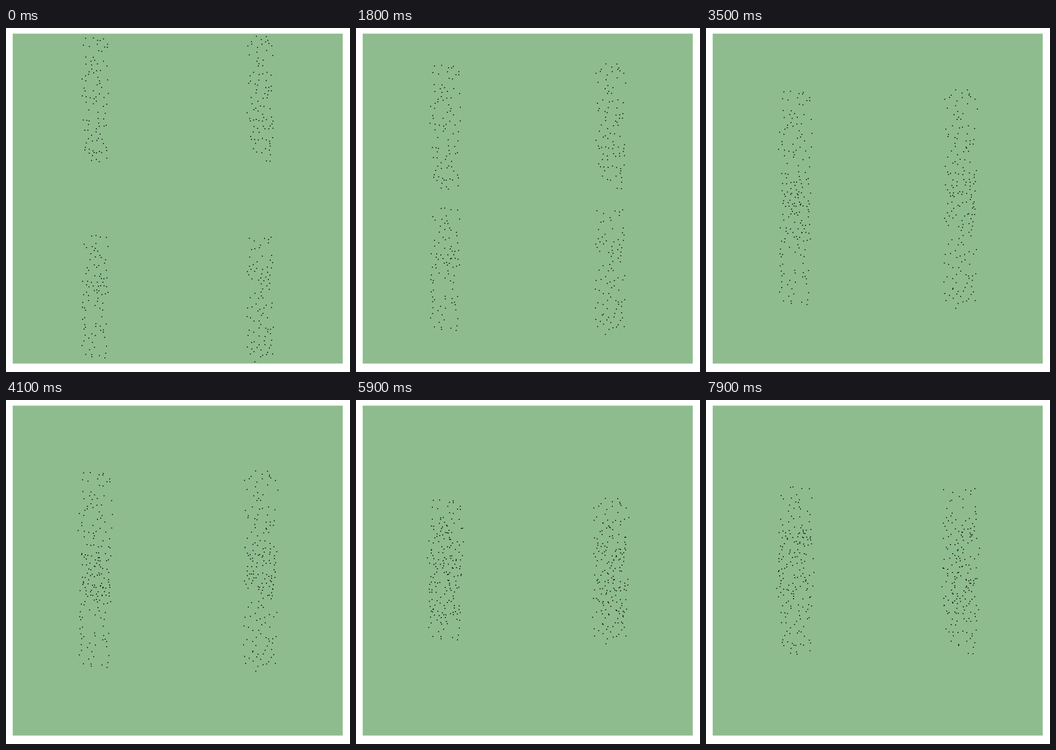
An HTML page with a canvas that plays this animation: 640 by 640 pixels, repeating every 8 s.

```html
<!DOCTYPE html>
<html>
<head>
<meta charset="utf-8">
<style>
html, body { margin: 0; width: 100%; height: 100%; overflow: hidden; background: #fff; }
canvas { display: block; }
</style>
</head>
<body>
<canvas id="stage" width="640" height="640"></canvas>
<script>
const ctx = document.getElementById('stage').getContext('2d');
const LOOP = 8000, STEP = 100, SPEED = 28.4;
const CROWD_SIZE = 95, WIDTH = 49, HEIGHT = 235, GAP = 4, RADIUS = 1;

let seed = 71;
function random() {
  seed = (seed * 16807) % 2147483647;
  return seed / 2147483647;
}

// Scatter a crowd without overlaps; each walker drifts outwards, a few of them far
function makeCrowd(cx, top, dir) {
  const crowd = [];
  while (crowd.length < CROWD_SIZE) {
    const offset = (random() - 0.5) * WIDTH;
    const x = cx + offset, y = top + random() * HEIGHT;
    if (crowd.some(w => Math.hypot(w.x - x, w.y - y) < GAP)) continue;
    const stray = (random() * 2 - 1) ** 3;
    crowd.push({ x, y, dir, drift: offset * 0.25 + stray * 7 });
  }
  return crowd;
}

const walkers = [166, 473].flatMap(cx => [
  ...makeCrowd(cx, 15, 1),
  ...makeCrowd(cx, 386, -1)
]);

const ease = t => 1 - Math.exp(-t / 4);

function draw(now) {
  const t = Math.floor(now % LOOP / STEP) * STEP / 1000;
  const spread = ease(t) / ease(6);
  ctx.fillStyle = '#fff';
  ctx.fillRect(0, 0, 640, 640);
  ctx.fillStyle = '#8fbc8f';
  ctx.fillRect(12.5, 10.5, 614, 613.8);
  ctx.fillStyle = '#000';
  ctx.beginPath();
  for (const w of walkers) {
    const x = w.x + w.drift * spread;
    const y = w.y + w.dir * SPEED * t;
    ctx.moveTo(x + RADIUS, y);
    ctx.arc(x, y, RADIUS, 0, 2 * Math.PI);
  }
  ctx.fill();
}

const start = performance.now();
function tick() {
  draw(performance.now() - start);
  requestAnimationFrame(tick);
}
tick();
</script>
</body>
</html>
```
